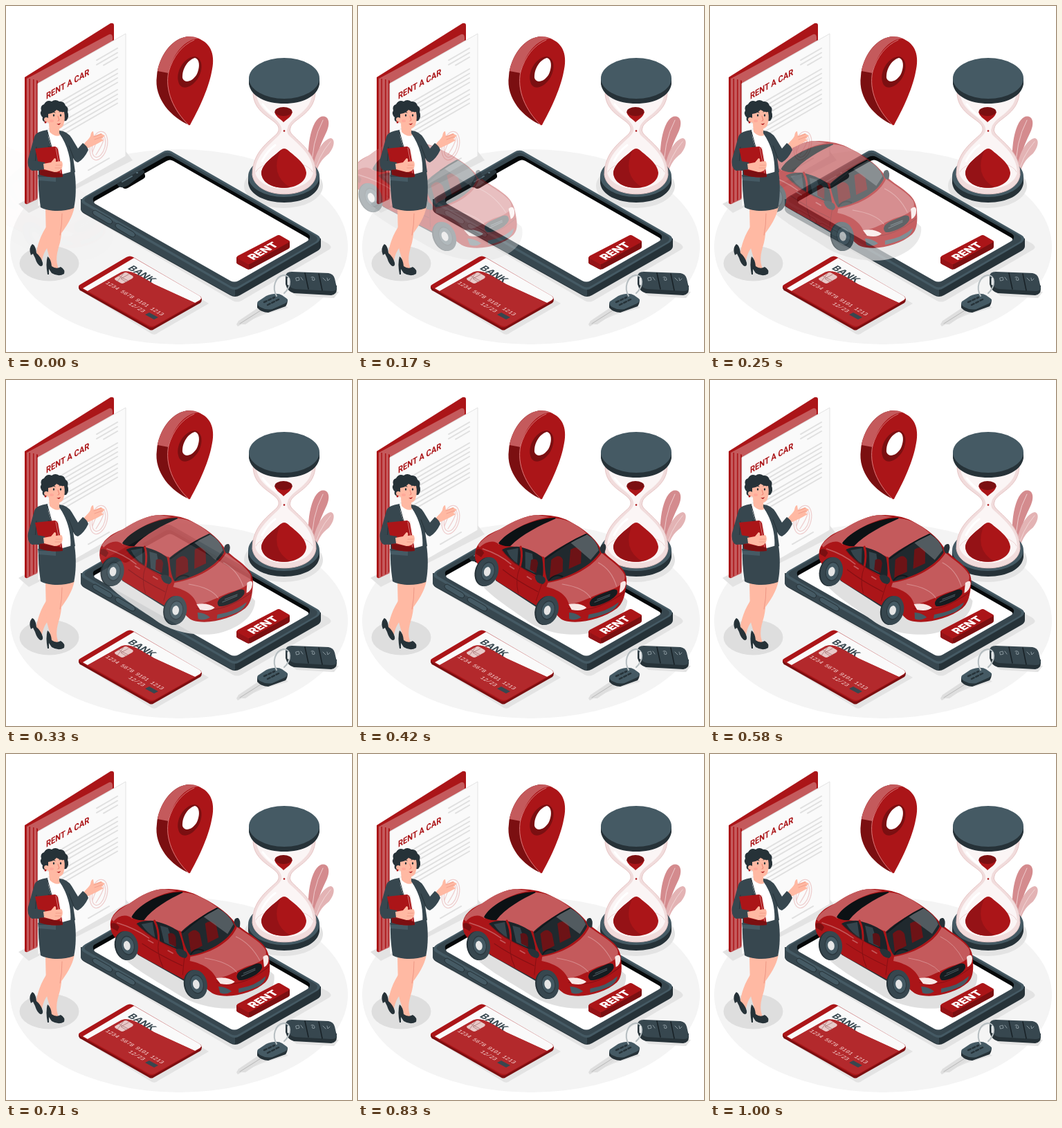
Write an HTML page that moves like this. It is 500x500 px and loops after 1040 ms.

```html
<!DOCTYPE html>
<html lang="en">
<head>
<meta charset="utf-8">
<title>Rent a car</title>
<style>
html, body { margin: 0; width: 100%; height: 100%; overflow: hidden; background: #fff; }
svg { display: block; width: 100%; height: 100%; }
text { font-family: Inter, Roboto, sans-serif; font-weight: 700; }
.title { font-family: Roboto, Inter, sans-serif; }
.mono { font-family: "Liberation Mono", "DejaVu Sans Mono", monospace; font-weight: 400; }
.red { fill: #ab1518; }
.dark { fill: #7b0f11; }
.rose { fill: #c45a5c; }
.slate { fill: #37474f; }
.ink { fill: #263238; }
.steel { fill: #455a64; }
.skin { fill: #ffb9a3; }
.shade { fill: #e3e3e3; }
.line { fill: none; stroke-linecap: round; stroke-linejoin: round; }
</style>
</head>
<body>
<svg viewBox="0 0 500 500">
<defs>
  <g id="wheel">
    <ellipse cx="-1" rx="16" ry="21" class="ink"/>
    <ellipse cx="1" rx="16" ry="21" class="slate"/>
    <ellipse cx="2" rx="10" ry="14" fill="#2b383f"/>
    <ellipse cx="2" rx="9" ry="12.5" class="steel"/>
    <ellipse cx="1" rx="4.800" ry="6.800" fill="#e6e6e6"/>
  </g>
</defs>

<ellipse cx="250" cy="348" rx="244" ry="141" fill="#f4f4f4"/>

<g id="folder">
  <path class="shade" d="M18 286L170 206L183 223L33 299Z"/>
  <path class="red" d="M27 103L151 25Q156 24 156 28V205L31 286Q27 287 27 283Z"/>
  <path class="rose" d="M30 105L149 41Q154 40 154 46V210L46 279L31 286L28 284V106Z"/>
  <path class="red" d="M27 103L30 104V286L27 284ZM33.500 105H35V283L33.500 284ZM39 106H40.500V280L39 281ZM44 107L46 108V277L44 278Z"/>
  <path d="M46 112L173 40V217L46 290Z" fill="#fafafa" stroke="#e3e3e3"/>
  <text class="title red" transform="matrix(.866 -.5 0 1 58 135)" font-size="12.800">RENT A CAR</text>
  <path id="copy" class="line" stroke="#e0e0e0" stroke-width="2"/>
  <g class="line" stroke="#efcfcf" stroke-width="1.3">
    <ellipse cx="134" cy="202" rx="12" ry="21" transform="rotate(15 134 202)"/>
    <ellipse cx="134" cy="202" rx="9" ry="17" transform="rotate(15 134 202)"/>
    <path d="M125 211Q133 188 139 190T130 215"/>
  </g>
</g>

<g id="hourglass">
  <ellipse cx="401" cy="260" rx="57" ry="32" class="shade"/>
  <path fill="#d48b8e" d="M440 246C433 222 437 168 455 160C466 157 469 168 464 180C457 196 448 211 445 244Z"/>
  <path fill="#e3b3b4" d="M442 247C443 220 455 194 469 191C476 192 475 203 467 213C456 222 450 229 447 249Z"/>
  <path class="line" stroke="#f4dcdc" stroke-width=".8" d="M458 165Q441 197 442 240M469 196Q450 218 445 246"/>
  <path class="ink" d="M350 246V256C352 273 375 284 402 284S451 273 453 256V246Z"/>
  <ellipse cx="401.500" cy="246" rx="51.500" ry="30" class="steel"/>
  <path fill="#f1dcdc" stroke="#e7c5c5" stroke-width="1" d="M357 126C358 157 391 163 394 176Q395 180 392 184C379 197 356 211 356 244C361 281 444 281 448 244C448 211 423 197 412 184Q409 180 411 176C414 163 445 157 447 126Z"/>
  <path fill="#fbf5f5" d="M362 130C367 155 394 160 398 176Q399 181 395 186C382 200 360 215 360 241C368 272 437 272 444 241C444 215 422 200 408 186Q405 181 407 176C411 160 438 155 442 130Z"/>
  <path class="line" stroke="#eed4d4" d="M361 240C369 220 435 220 443 240"/>
  <path class="red" d="M369 241C371 226 389 216 397 208Q402 204 407 208C416 216 433 227 434 241C433 270 370 270 369 241Z"/>
  <path fill="#951216" d="M369 241C371 226 389 216 397 208Q389 224 392 239Q396 254 411 262C390 265 370 258 369 241Z"/>
  <path class="red" d="M388 153C390 161 398 164 401 168C405 164 412 161 414 153Z"/>
  <ellipse cx="401" cy="152.500" rx="12.500" ry="6.500" class="dark"/>
  <circle cx="402" cy="180.500" r="1.300" class="red"/>
  <path class="line" stroke="#fff" stroke-width="3" d="M371 142Q380 154 390 160M370 224Q377 210 389 201"/>
  <path class="ink" d="M351 104V113C354 131 376 141 402 141S450 131 453 113V104Z"/>
  <ellipse cx="402" cy="104.500" rx="51" ry="29.500" class="steel"/>
</g>

<g id="phone">
  <path class="shade" d="M112 300L328 426Q334 429 340 426L467 352Q473 348 465 343L440 330Z"/>
  <path class="ink" d="M108 279V293Q108 297 113 300L324 418Q331 422 338 418L450 354Q455 351 455 347V336Z"/>
  <path class="slate" d="M108 280V292Q108 296 113 299L324 417Q331 420 331 420V408Z"/>
  <path class="steel" d="M118 273L226 211Q232 207 239 210L450 331Q458 336 450 342L337 408Q331 412 324 408L112 286Q104 280 118 273Z"/>
  <path class="slate" d="M120 274L227 213Q232 210 238 213L447 332Q453 336 447 341L336 405Q331 408 325 405L116 284Q109 280 120 274Z"/>
  <path fill="#050809" d="M127 276L228 219Q234 215 240 218L436 329Q442 333 437 338L336 396Q330 399 324 396L128 285Q124 280 127 276Z"/>
  <path fill="#fff" d="M128 282L167 260Q170 266 176 263L198 250Q203 247 200 242L232 224Q237 221 242 224L434 334Q440 337 435 340L336 397Q330 400 324 397L129 286Q126 284 128 282Z"/>
  <path class="ink" d="M160 257L193 238Q201 235 200 241L177 259Q168 264 163 261Z"/>
  <path class="line" stroke="#59707b" stroke-width="2" d="M168 254L182 246M189 241h1"/>
  <g class="steel" stroke="#263238" stroke-width="1">
    <path d="M129 295L150 307Q155 310 153 314Q151 316 147 314L127 302Q122 296 129 295Z"/>
    <path d="M162 314L183 326Q188 329 186 333Q184 335 180 333L160 321Q155 315 162 314Z"/>
  </g>
</g>

<g id="car" opacity="0">
  <path fill="#e0e0e0" d="M157 275C160 299 220 330 244 346C272 366 319 373 346 364C376 354 388 336 386 319L300 240Z"/>
  <path class="ink" d="M180 268L290 330L280 342L190 290Z"/>
  <path class="red" d="M152 248C152 233 165 222 181 216C197 205 215 195 232 195C249 195 265 197 279 204C300 214 320 227 332 243C339 252 355 260 366 270C376 278 380 287 380 300C381 315 379 324 373 330C357 344 329 352 307 349C298 348 292 344 287 338L254 325L194 292L159 266Q152 259 152 248Z"/>
  <path class="rose" d="M154 239C159 227 176 219 184 214C198 204 216 195 232 195L249 198C217 203 192 221 184 238C178 231 165 232 157 242Z"/>
  <path fill="#0c1114" d="M183 236C190 221 222 200 258 199L259 203C238 211 214 225 202 240Q190 241 183 236Z"/>
  <path class="rose" d="M201 240C214 223 238 210 259 200C277 201 294 211 308 222C291 231 270 242 254 257C240 250 218 242 201 240Z"/>
  <path fill="#1b2429" d="M190 245Q200 240 215 241C232 245 246 252 252 258Q257 274 257 287L221 270Q203 261 190 245Z"/>
  <path class="steel" opacity=".6" d="M197 246L213 243L216 265Q205 259 197 246ZM224 248L235 251L244 279L229 272Z"/>
  <path fill="#5c1216" d="M235 260q8-4 11 5v14l-10-5Z"/>
  <path class="line" stroke="#ab1518" stroke-width="3" d="M216 241Q222 253 221 271M252 257Q257 271 259 288"/>
  <path fill="#20292e" d="M254 257C270 242 292 230 308 222C319 229 328 238 332 249C324 268 295 286 266 291Q259 283 254 257Z"/>
  <path fill="#6d1316" d="M264 260q10-11 17 0l3 17-17 9ZM289 245q9-7 16 2l3 18-16 8Z"/>
  <path fill="#6d777b" opacity=".65" d="M287 235L308 223Q325 232 330 246L321 260Z"/>
  <path class="line" stroke="#11181c" stroke-width="2" d="M267 289Q274 279 285 284M256 258Q282 235 307 223"/>
  <path class="rose" d="M266 293C300 287 326 270 335 250C350 261 366 270 374 281C380 293 369 300 354 305C338 309 328 319 303 325C298 314 288 304 265 299Z"/>
  <path class="line" stroke="#d78c8d" stroke-width="1" d="M287 295Q320 300 332 315M333 264Q354 274 366 298"/>
  <path class="line" stroke="#860f13" stroke-width="1" d="M190 246Q208 265 258 290M221 271Q217 287 226 308M258 290Q256 302 254 319M197 274Q220 290 254 306M303 330Q338 340 379 307"/>
  <path class="line" stroke="#c45a5c" stroke-width="1.500" d="M162 244Q188 252 207 266M206 269l7 4M234 284l7 4"/>
  <path fill="#151c20" d="M332 321Q333 315 342 311L361 303Q370 301 369 309C365 319 344 328 335 327Q332 325 332 321Z"/>
  <path class="line" stroke="#4e5c63" stroke-width="1" d="M339 321l20-9M342 317l17-7"/>
  <path fill="#f8e8e6" d="M302 324Q318 321 329 329Q323 335 308 332ZM371 293Q378 287 379 295Q379 305 372 308Z"/>
  <path class="steel" d="M305 336Q315 336 324 343Q315 349 307 345ZM334 339Q359 335 374 321Q373 329 364 335Q349 342 334 345Z"/>
  <path class="ink" d="M245 283Q251 279 260 286Q264 291 259 295Q248 294 245 283ZM331 244Q331 236 337 237Q341 240 339 250Q335 253 331 244Z"/>
  <path class="dark" d="M153 245q7-3 12 5l-3 6-9-5Z"/>
  <use href="#wheel" transform="translate(174 277) rotate(-8)"/>
  <use href="#wheel" transform="translate(272 333) rotate(-8)"/>
</g>

<g id="rentButton">
  <path class="dark" d="M333 363L350 373L410 340V348Q410 350 408 351L354 380Q351 381 348 380L335 373Q333 372 333 370Z"/>
  <path fill="#951216" d="M333 363L351 373V381L335 373Q333 372 333 370Z"/>
  <path class="red" d="M335 361L391 332Q394 330 397 332L409 339Q411 340 408 342L354 372Q351 374 348 372L335 365Q332 363 335 361Z"/>
  <text transform="matrix(.866 -.5 .866 .5 357.500 367.500)" font-size="15.800" style="font-weight:900" fill="#fff">RENT</text>
</g>

<g id="woman">
  <ellipse cx="62.500" cy="372" rx="43" ry="25.500" fill="#dedede"/>
  <path class="skin" d="M69 291L99 290C96 306 87 319 78 331C66 343 55 349 52 369L43 362C45 346 50 330 61 315Z"/>
  <path class="skin" d="M57 292H82C80 312 82 326 78 342C74 356 70 367 77 382L65 380C66 365 57 353 58 337Z"/>
  <path class="line" stroke="#ee9785" d="M81 300Q81 317 78 331"/>
  <path class="ink" d="M38 344Q43 346 44 357Q51 363 53 371Q54 376 50 376Q45 374 42 364L39 358L36 360Q32 350 38 344ZM60 362Q65 365 66 376Q73 381 79 377Q86 381 84 387Q76 392 66 386L62 380V388L60 388Q57 372 60 362Z"/>
  <path class="slate" d="M47 243L99 239C102 258 101 280 98 292C82 298 61 297 50 291Q46 265 47 243Z"/>
  <path class="steel" d="M46 244L72 246V254L47 252Z"/>
  <path class="skin" d="M111 202C115 195 119 194 122 188Q123 181 126 181L127 188L137 184L140 186L143 187L138 192L141 194L132 199Q124 203 117 206Z"/>
  <path class="line" stroke="#ee9785" stroke-width=".8" d="M127 189l11-4M128 193l11-4"/>
  <path fill="#fff" d="M60 178L80 183L95 207L96 239L78 244L63 212Z"/>
  <path class="skin" d="M62 171L77 176L78 187Q71 190 63 182Z"/>
  <path class="slate" d="M60 179C49 181 43 183 41 189L32 221Q30 235 39 237L47 238V247L74 247Q77 237 69 216L61 189Z"/>
  <path class="slate" d="M77 180Q89 181 95 191L104 206L111 198Q117 202 119 208Q113 221 104 226Q99 225 97 219L100 240L93 243C95 223 89 201 77 184Z"/>
  <path class="line" stroke="#263238" d="M60 182L66 204L61 203M44 204L42 232M91 202L98 220"/>
  <path fill="#f4e8e7" d="M70 203L76 204L82 239L79 242Z"/>
  <path class="red" d="M42 206L71 203Q74 204 75 207L82 246Q66 250 50 243Z"/>
  <path class="line" stroke="#d57879" d="M72 205L79 242"/>
  <path class="dark" d="M48 236L81 242L82 247Q64 249 49 244Z"/>
  <path class="slate" d="M32 222L56 226L57 236L38 238Q31 236 32 222Z"/>
  <path class="skin" d="M54 228L65 226L70 220Q73 220 72 225L80 224Q83 227 81 234Q78 240 70 240L55 236Z"/>
  <path class="line" stroke="#ee9785" stroke-width=".8" d="M72 230h8M71 234h8"/>
  <path class="ink" d="M57 168Q51 166 53 161Q48 156 51 151Q49 144 55 142Q59 135 66 138Q71 134 77 138Q84 137 86 144Q91 147 89 153Q92 160 87 166Z"/>
  <path class="skin" d="M61 156Q69 155 73 150Q79 154 84 153Q86 163 83 172Q80 179 71 177Q63 175 61 168Q55 169 55 163Q57 159 61 162Z"/>
  <path class="line" stroke="#263238" stroke-width="1" d="M66 154q3-2 5 0M77 153q3-2 4 0"/>
  <ellipse cx="69" cy="158" rx="1.200" ry="1.700" class="ink"/>
  <ellipse cx="79" cy="158" rx="1.200" ry="1.700" class="ink"/>
  <path class="line" stroke="#ec806f" d="M75 159l2 6-2 1"/>
  <path class="red" d="M73 170q3 1 6-1-1 3-3 3Z"/>
  <circle cx="57" cy="168" r="1.500" class="red"/>
  <ellipse cx="66" cy="166" rx="3" ry="2" fill="#ffa999"/>
</g>

<g id="card">
  <path class="shade" d="M112 414L211 474Q216 476 220 472L293 430L280 422Z"/>
  <path class="dark" d="M105 405V408Q106 411 109 412L206 467Q210 470 214 467L281 429Q283 427 283 423Z"/>
  <path class="red" d="M108 402L174 363Q179 360 184 363L280 419Q285 422 280 426L215 463Q210 466 205 463L108 408Q102 405 108 402Z"/>
  <path fill="#fafafa" d="M111 408L185 364L280 419Q284 422 280 425L273 429L214 402C192 388 178 380 166 385L118 412Z"/>
  <path fill="#b3292c" d="M118 412L166 385C178 380 192 388 214 402L273 429L215 462Q210 464 205 461Z"/>
  <path fill="#e8c9c8" d="M158 393L170 386Q173 384 176 386L183 390Q185 392 182 394L171 400Q168 402 165 400L158 396Q156 394 158 393Z"/>
  <path class="line" stroke="#a87575" stroke-width=".8" d="M163 390l13 7M170 386l-9 12M177 388l-11 6 8 5"/>
  <text transform="matrix(.866 .5 -.866 .5 175 379.500)" font-size="14" class="slate">BANK</text>
  <g fill="#fae2df" font-size="8.300">
    <text class="mono" transform="matrix(.866 .5 -.866 .5 143 400.500)">1234 5678 9101 1213</text>
    <text class="mono" transform="matrix(.866 .5 -.866 .5 176 430.500)">12/23</text>
  </g>
  <path class="slate" d="M201 446l6-3 13 7-6 3Z"/>
</g>

<g id="key">
  <path class="shade" d="M405 408L420 419L474 422L481 413ZM337 461L372 446L408 436L397 428Z"/>
  <path class="ink" d="M404 391V402Q407 413 416 415L470 418Q478 417 478 409V404Z"/>
  <path class="slate" d="M413 384L466 386Q473 387 475 394L478 407Q478 412 470 412L418 409Q411 408 408 402L404 391Q404 384 413 384Z"/>
  <path class="line" stroke="#182126" stroke-width="1.500" d="M432 386L437 409M452 387L457 411"/>
  <path class="line" stroke="#9eabb1" stroke-width=".8" d="M419 393l4-1 1 4-4 1zM426 392l3 4M441 392q5-2 5 4-5 2-3-3M458 393l4 4M464 393l1 4 3-3"/>
  <path fill="#dedede" d="M366 435L336 455L333 460L335 463L340 460L346 460L371 443Z"/>
  <path class="line" stroke="#b8b8b8" stroke-width="1" d="M338 459L368 440"/>
  <path class="ink" d="M363 430V436Q369 443 379 443L404 434Q407 430 407 424Z"/>
  <path class="steel" d="M364 427L376 419Q391 413 399 418L406 423Q409 426 403 430L385 438Q376 440 367 435Q361 431 364 427Z"/>
  <path class="line" stroke="#263238" stroke-width="2.500" stroke-dasharray="4 3" d="M373 428L388 421M378 432L394 424"/>
  <path class="line" stroke="#b5bdc0" stroke-width="2" d="M391 419C384 407 389 391 401 389C413 389 413 405 402 415"/>
  <path class="line" stroke="#e7eaeb" stroke-width="3" d="M408 394v8"/>
</g>

<g id="pin">
  <path class="dark" d="M265 172C240 162 213 134 218 101C220 75 239 44 266 44L290 65L270 155Z"/>
  <path class="rose" d="M219 94C223 70 242 44 266 44Q275 44 282 49C259 49 243 70 235 97Z"/>
  <path class="red" d="M264 172C243 153 228 123 235 95C242 68 259 48 278 47C297 54 303 72 297 96C292 122 276 154 267 170Q266 173 264 172Z"/>
  <path class="dark" d="M249 109C245 93 259 73 273 73C285 75 285 93 277 105C268 119 252 123 249 109Z"/>
  <path fill="#fff" d="M255 104C254 90 264 77 273 75C281 77 280 91 275 100C268 110 258 112 255 104Z"/>
  <path class="line" stroke="#d57879" stroke-width="1" d="M235 95C229 121 242 151 264 172M235 95Q245 61 272 49"/>
</g>
</svg>
<script>
const LOOP = 1040, STEP = LOOP / 25, LEAD = 30;
const CENTER_Y = 281.5;
const car = document.getElementById("car");

// Ruled text on the contract; all rows rise at the same isometric slope.
const row = (x1, x2, endY) => `M${x1} ${endY + (x2 - x1) * .577}L${x2} ${endY}`;
document.getElementById("copy").setAttribute("d", [
  row(131, 161, 61), row(131, 161, 67.5), row(141, 161, 74),
  ...[91, 97.5, 104, 110.5, 121, 127.5, 134, 140.5].map(y => row(60, 161, y)),
  row(119, 149, 220)
].join(""));

const bezier = (a, b, s) => 3 * (1 - s) ** 2 * s * a + 3 * (1 - s) * s * s * b + s ** 3;

function ease(x) {
  let low = 0, high = 1;
  for (let i = 0; i < 24; i++) {
    const mid = (low + high) / 2;
    if (bezier(.36, .5, mid) < x) low = mid; else high = mid;
  }
  return bezier(-.01, 1.38, low);
}

const mix = (a, b, p) => a + (b - a) * p;

function render(time) {
  const tick = Math.floor((time % LOOP + 5) / STEP) % 25;
  const phase = Math.min(1, (tick * STEP + LEAD) / 1000);
  let shift = 0, skew, opacity = 1;
  if (phase < .6) {
    const p = ease(phase / .6);
    shift = mix(-250, 0, p);
    skew = mix(20, -10, p);
    opacity = Math.max(0, Math.min(1, p));
  } else if (phase < .8) {
    skew = mix(-10, 2, ease((phase - .6) / .2));
  } else {
    skew = mix(2, 0, ease((phase - .8) / .2));
  }
  car.setAttribute("transform", `translate(${shift} ${CENTER_Y}) skewX(${skew}) translate(0 ${-CENTER_Y})`);
  car.setAttribute("opacity", opacity);
}

function frame(now) {
  render(now);
  requestAnimationFrame(frame);
}
render(0);
requestAnimationFrame(frame);
</script>
</body>
</html>
```
